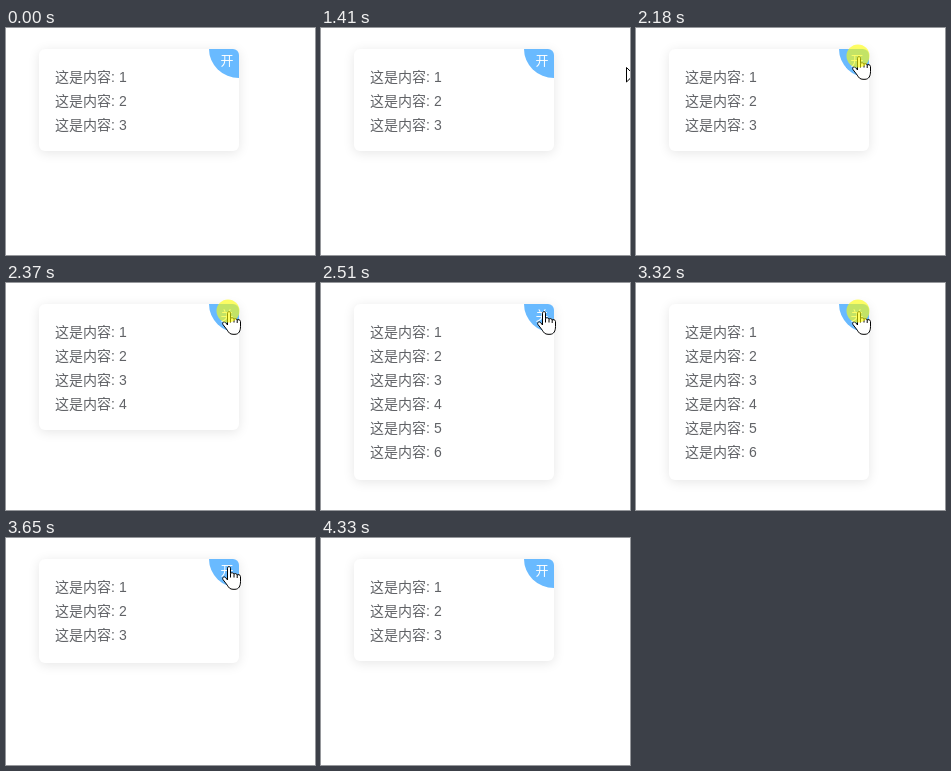
Animation, 309 px wide and 227 px high, one loop 5260 ms. Source, as an HTML page:

```html
<!DOCTYPE html>
<html lang="zh-CN">
<head>
<meta charset="utf-8">
<style>
html, body { margin: 0; width: 100%; height: 100%; overflow: hidden; background: #fff; }
body { position: relative; font: 14px/24px "Liberation Sans", "Noto Sans CJK SC", "Noto Sans CJK", sans-serif; color: #606266; }
#card { position: absolute; left: 33px; top: 21px; width: 200px; border-radius: 6px; background: #fff; box-shadow: 0 2px 12px rgba(0, 0, 0, .1); overflow: hidden; }
#list { position: absolute; left: 16px; top: 16px; right: 16px; bottom: 14px; overflow: hidden; word-spacing: .2px; }
#list div { height: 24px; white-space: nowrap; }
#corner { position: absolute; right: 0; top: 0; width: 30px; height: 29px; border-bottom-left-radius: 100%; background: #69baff; }
#label { position: absolute; left: 11.5px; top: 0; font-size: 13px; color: #fff; }
svg { position: absolute; left: 0; top: 0; width: 309px; height: 227px; }
#hand, #arrow { fill: #fff; stroke: #000; stroke-linejoin: round; }
</style>
</head>
<body>
<div id="card">
  <div id="list"></div>
  <div id="corner"><span id="label">开</span></div>
</div>
<svg viewBox="0 0 309 227">
  <path id="arrow" d="M.5 .5V15l3.4-3.3 2.6 4.9 2.2-1-2.5-4.8H11Z"/>
  <g id="hand">
    <path d="M5.5 14V2.2C5.5 .1 8.5 .1 8.5 2.2V7.6C9 6.4 11.7 6.6 12 8.2C12.5 7.2 15 7.4 15.2 9C15.9 8.2 18.5 8.6 18.5 10.6V15.5C18.5 20 16.8 23.3 13 23.3H11C8 23.3 6.6 21.5 5.3 19.2L1 13.6C-.2 11.6 2 9.9 3.6 11.6Z"/>
    <path d="M8.5 7.6V11.5M12 8.2V11.5M15.2 9V12" fill="none"/>
  </g>
  <circle id="glow" cx="222" cy="28" r="11.5" fill="#ff0" fill-opacity=".6"/>
</svg>
<script>
const LOOP = 5260, STEP = 65;
const ENTER = 1410, OPEN = 2180, CLOSE = 3320, LEAVE = 4270, GONE = 4330;
const CLOSED = 102, OPENED = 176;
const $ = id => document.getElementById(id);

$('list').innerHTML = [1, 2, 3, 4, 5, 6].map(n => `<div>这是内容: ${n}</div>`).join('');

// Progress from start in whole screen updates, limited to a count of steps
const stepped = (t, start, count) =>
  Math.max(0, Math.min(count, Math.floor((t - start) / STEP)));
const easeInOut = p => p < .5 ? 2 * p * p : 1 - 2 * (1 - p) ** 2;

function cardHeight(t) {
  if (t < OPEN || t >= GONE) return CLOSED;
  if (t < CLOSE) return CLOSED + (OPENED - CLOSED) * easeInOut(stepped(t, OPEN, 5) / 5);
  return OPENED - (OPENED - CLOSED - 2) * easeInOut(stepped(t, CLOSE, 5) / 5);
}

function pointer(t) {
  if (t >= LEAVE) return [255, 31];
  const p = 1 - (1 - stepped(t, ENTER, 8) / 8) ** 2;
  return [305 - 83 * p, 39 - 11 * p];
}

function show(id, on, x = 0, y = 0) {
  $(id).style.display = on ? '' : 'none';
  $(id).setAttribute('transform', `translate(${Math.round(x)} ${Math.round(y)})`);
}

function draw(now) {
  const t = now % LOOP;
  $('card').style.height = cardHeight(t) + 'px';
  $('label').textContent = t >= OPEN + STEP + 5 && t < CLOSE + STEP + 5 ? '关' : '开';

  const [x, y] = pointer(t);
  const visible = t >= ENTER && t < GONE;
  const overCorner = x < 233;
  show('arrow', visible && !overCorner, x, y);
  show('hand', visible && overCorner, x - 6, y);
  show('glow', [OPEN, CLOSE].some(c => t >= c && t < c + 3 * STEP));
  requestAnimationFrame(draw);
}
requestAnimationFrame(draw);
</script>
</body>
</html>
```
